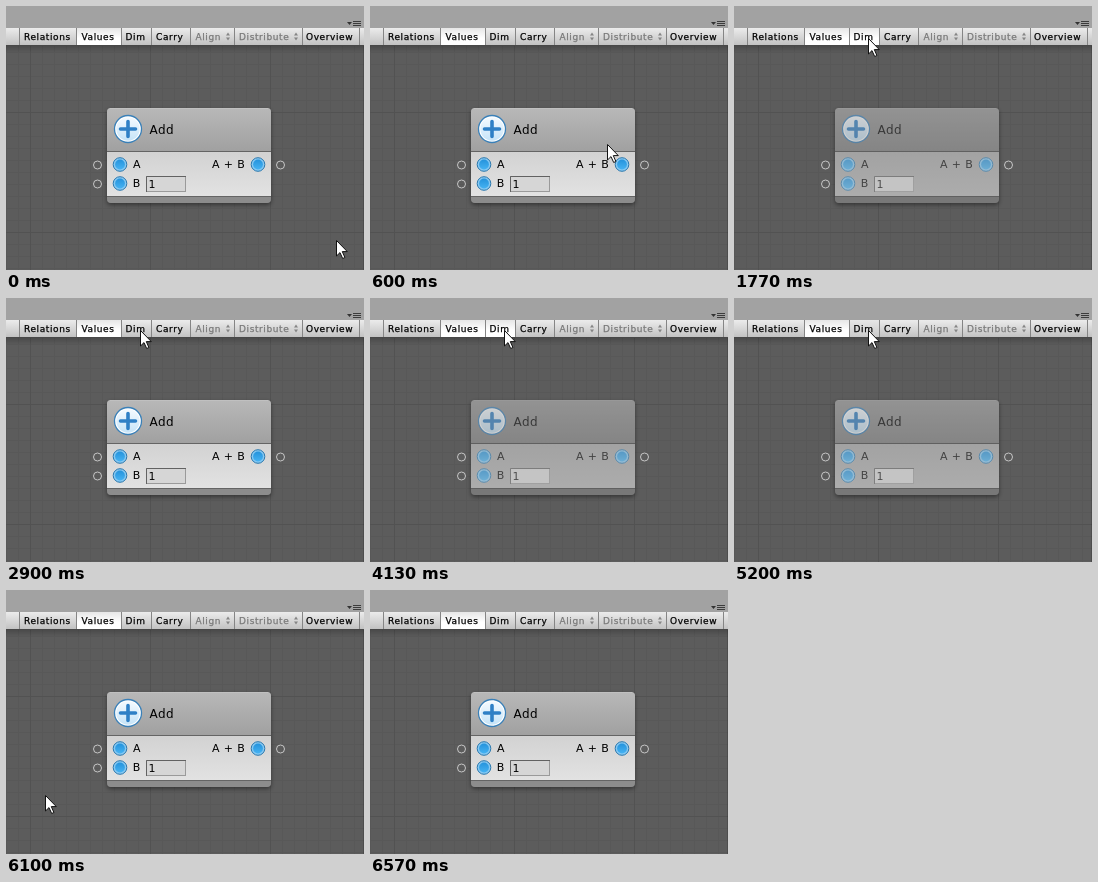
An HTML page for the animation above (7060 ms loop, 358x264 px).

```html
<!DOCTYPE html>
<html lang="en">
<head>
<meta charset="utf-8">
<title>Dim toggle</title>
<style>
html, body { margin: 0; height: 100%; overflow: hidden; background: #5c5c5c; }
svg { display: block; width: 358px; height: 264px; }
text { font: 11px "DejaVu Sans", sans-serif; letter-spacing: .35px; }
#bar text { font-size: 9px; letter-spacing: .6px; stroke-width: .25px; }
.dim > * { opacity: .6; }
.rim { fill: #86c8f2; stroke: #2a78ae; }
.core { fill: url(#blue); }
.pin { fill: none; stroke: #c6c6c6; }
</style>
</head>
<body>
<svg id="stage" viewBox="0 0 358 264">
  <defs>
    <linearGradient id="normal" x2="0" y2="1"><stop stop-color="#ececec"/><stop offset="1" stop-color="#c2c2c2"/></linearGradient>
    <linearGradient id="active" x2="0" y2="1"><stop stop-color="#b4b4b4"/><stop offset="1" stop-color="#a8a8a8"/></linearGradient>
    <linearGradient id="on" x2="0" y2="1"><stop stop-color="#e6e6e6"/><stop offset=".6" stop-color="#fff"/></linearGradient>
    <linearGradient id="onActive" x2="0" y2="1"><stop stop-color="#e6e6e6"/><stop offset="1" stop-color="#cacaca"/></linearGradient>
    <linearGradient id="head" x2="0" y2="1"><stop stop-color="#b8b8b8"/><stop offset="1" stop-color="#a0a0a0"/></linearGradient>
    <linearGradient id="body" x2="0" y2="1"><stop stop-color="#d2d2d2"/><stop offset="1" stop-color="#e2e2e2"/></linearGradient>
    <linearGradient id="blue" x2="0" y2="1"><stop stop-color="#2593dc"/><stop offset="1" stop-color="#45b2f2"/></linearGradient>
    <linearGradient id="disc" x2="0" y2="1"><stop stop-color="#f4faff"/><stop offset="1" stop-color="#c6e4f8"/></linearGradient>
    <linearGradient id="shade" x2="0" y2="1"><stop stop-opacity=".22"/><stop offset="1" stop-opacity="0"/></linearGradient>
    <filter id="blur"><feGaussianBlur stdDeviation="2"/></filter>
    <pattern id="minor" width="12" height="12" y="10" patternUnits="userSpaceOnUse"><path d="M.5 0V12M0 .5H12" stroke="#585858"/></pattern>
    <pattern id="major" width="120" height="120" x="24" y="106" patternUnits="userSpaceOnUse"><path d="M.5 0V120M0 .5H120" stroke="#525252"/></pattern>
    <g id="port">
      <circle class="rim" r="6.8"/>
      <circle class="core" r="4.9"/>
    </g>
  </defs>

  <rect width="358" height="264" fill="#5c5c5c"/>
  <rect width="358" height="264" fill="url(#minor)"/>
  <rect width="358" height="264" fill="url(#major)"/>
  <rect y="39" width="358" height="8" fill="url(#shade)"/>
  <path d="M357.5 39V264" stroke="#000" opacity=".15"/>

  <rect width="358" height="22" fill="#a2a2a2"/>
  <path d="M341 16h5l-2.5 3z" fill="#333"/>
  <path d="M347 15.5h8M347 17.5h8M347 19.5h8" stroke="#3c3c3c"/>
  <rect y="22" width="358" height="17" fill="url(#normal)"/>
  <g id="bar"></g>
  <path d="M0 39.5H358" stroke="#484848"/>

  <rect x="101" y="104" width="164" height="95" rx="4" opacity=".42" filter="url(#blur)"/>
  <rect x="101" y="102" width="164" height="95" rx="4" fill="#5c5c5c"/>
  <g id="node">
    <g>
      <rect x="101" y="102" width="164" height="95" rx="4" fill="#8c8c8c"/>
      <path d="M101 146V106a4 4 0 0 1 4-4H261a4 4 0 0 1 4 4V146z" fill="url(#head)"/>
      <path d="M104 102.5H262" stroke="#c0c0c0"/>
      <rect x="101" y="146" width="164" height="44" fill="url(#body)"/>
      <path d="M101 145.5H265M101 190.5H265" stroke="#646464"/>
    </g>
    <g>
      <circle cx="122" cy="123" r="13.5" fill="#fff" stroke="#3a80b8" stroke-width="1.3"/>
      <circle cx="122" cy="123" r="11.7" fill="url(#disc)"/>
      <path d="M122 115.5v15M114.5 123h15" stroke="#2f80c6" stroke-width="3.6" stroke-linecap="round"/>
    </g>
    <text x="143.5" y="128" style="font-size:12px;letter-spacing:.5px">Add</text>
    <use href="#port" x="114" y="158.5"/>
    <use href="#port" x="114" y="177.5"/>
    <use href="#port" x="252" y="158.5"/>
    <text x="127" y="162">A</text>
    <text x="126.7" y="181">B</text>
    <text x="206" y="162">A + B</text>
    <g>
      <rect x="140.5" y="170.5" width="39" height="15" fill="#d6d6d6" stroke="#9a9a9a"/>
      <path d="M140.5 186V170.5H180" fill="none" stroke="#626262"/>
    </g>
    <text x="142.5" y="182">1</text>
  </g>
  <circle class="pin" cx="91.5" cy="159" r="4"/>
  <circle class="pin" cx="91.5" cy="178" r="4"/>
  <circle class="pin" cx="274.5" cy="159" r="4"/>

  <path id="cursor" d="M.5 .5V16L4 12.6L6.7 18.5L8.9 17.5L6.3 11.6H11.3Z" fill="#fff" stroke="#111"/>
</svg>
<script>
const $ = id => document.getElementById(id);
const LOOP = 7060;

// label, left edge, right edge, text x, disabled popup
const buttons = [
  ['Relations', 14, 71, 18], ['Values', 71, 116, 75.5], ['Dim', 116, 146, 119.5],
  ['Carry', 146, 185, 150], ['Align', 185, 229, 189.5, true],
  ['Distribute', 229, 297, 233, true], ['Overview', 297, 354, 300]
];
$('bar').innerHTML = buttons.map(([label, x, end, tx, popup]) => {
  const ink = popup ? '#787878' : '#000';
  const arrows = `<path d="M${end - 9} 29.5l2-3 2 3zm0 2l2 3 2-3z" fill="#858585"/>`;
  return `
    <rect id="${label}" x="${x}" y="22" width="${end - x}" height="17" fill="url(#normal)"/>
    <path d="M${end - .5} 22V39" stroke="#858585"/>
    <text x="${tx}" y="34" fill="${ink}" stroke="${ink}">${label}</text>
    ${popup ? arrows : ''}`;
}).join('') + '<path d="M13.5 22V39" stroke="#858585"/>';
$('Values').setAttribute('fill', 'url(#on)');

// start time, step count, from, control point, to
const moves = [
  [330, 22, [330, 234], [235, 135], [141, 44]],
  [1070, 10, [141, 44], [137, 38], [134, 32]],
  [5570, 22, [134, 32], [67, 94], [32, 229]],
  [6300, 9, [32, 229], [31, 246], [31, 265]]
];
const ease = u => { const v = 1 - (1 - u) ** 1.3; return v * v * (3 - 2 * v); };

function cursorAt(t) {
  let pos = moves[0][2];
  for (const [start, steps, a, c, b] of moves) {
    if (t < start) break;
    const u = Math.min(1, (Math.floor((t - start) * .03 + .01) + 1) / steps);
    const s = start === 6300 ? u : ease(u);
    pos = a.map((p, i) => Math.round((1 - s) ** 2 * p + 2 * s * (1 - s) * c[i] + s * s * b[i]));
  }
  return pos;
}

const states = [
  [0, 'normal'], [1600, 'active'], [1770, 'on'], [2730, 'onActive'], [2900, 'normal'],
  [3900, 'active'], [4130, 'on'], [5200, 'onActive'], [5400, 'normal']
];

function draw(now) {
  const t = now % LOOP;
  const state = states.filter(s => s[0] <= t).pop()[1];
  $('Dim').setAttribute('fill', `url(#${state})`);
  $('node').setAttribute('class', state.startsWith('on') ? 'dim' : '');
  $('cursor').setAttribute('transform', `translate(${cursorAt(t)})`);
}

const begin = performance.now();
(function tick() {
  draw(performance.now() - begin);
  requestAnimationFrame(tick);
})();
</script>
</body>
</html>
```
